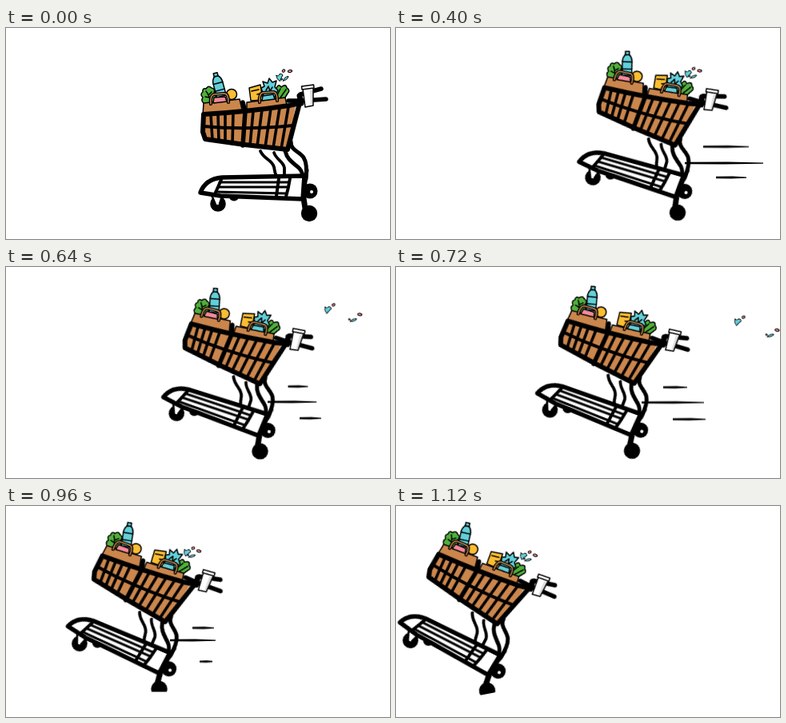
Recreate the animation shown at these times as an HTML page. Size 480 by 264 pixels, loop 1.2 s.

```html
<!DOCTYPE html>
<html lang="en">
<head>
<meta charset="utf-8">
<title>Shopping cart</title>
<style>
html, body { margin: 0; width: 100%; height: 100%; overflow: hidden; background: #fff; }
svg { display: block; width: 480px; height: 264px; }
.ink { fill: none; stroke: #000; stroke-linecap: round; stroke-linejoin: round; }
.thin { stroke: #000; stroke-width: 1.5; stroke-linejoin: round; stroke-linecap: round; }
.brown { fill: #cb864c; }
.teal { fill: #62d0da; }
.green { fill: #50b03c; }
.gold { fill: #fbbd32; }
.pink { fill: #f58a9b; }
.white { fill: #fff; }

.cart, .near, .far, .dash, .crop { animation: 1.2s infinite step-end; }
.cart { transform-origin: 379px 232px; animation-name: ride; }
.near { animation-name: near; }
.far { animation-name: far; }
.high { animation-name: high; }
.mid { animation-name: mid; }
.low { animation-name: low; }
.crop { animation-name: crop; }

/* Movement advances in 80 ms steps. */
@keyframes ride {
  0% { transform: translate(0, 0) rotate(0); }
  20% { transform: translate(-10px, -1px) rotate(16.5deg); animation-timing-function: steps(2); }
  33.33% { transform: translate(-27px, -1px) rotate(16.5deg); animation-timing-function: steps(2); }
  46.66% { transform: translate(-39px, -.7px) rotate(16.5deg); animation-timing-function: steps(2); }
  60% { transform: translate(-84px, -2px) rotate(20.5deg); animation-timing-function: steps(3); }
  80% { transform: translate(-187.5px, -3px) rotate(23.7deg); animation-timing-function: steps(2); }
  93.33%, 100% { transform: translate(-265px, -1px) rotate(27.2deg); }
}
@keyframes near {
  0%, 66.66%, 100% { transform: translate(0, 0); }
  33.33% { transform: translate(0, 0); animation-timing-function: steps(2); }
  46.66% { transform: translate(18px, -22px); animation-timing-function: steps(2); }
  60% { transform: translate(104px, -27px); }
}
@keyframes far {
  0%, 66.66%, 100% { transform: translate(0, 0); }
  33.33% { transform: translate(0, 0); animation-timing-function: steps(2); }
  46.66% { transform: translate(35px, -21px); animation-timing-function: steps(2); }
  60% { transform: translate(141px, -27px); }
}
@keyframes high {
  0% { transform: translate(402px, 149px) scaleX(0); }
  20% { transform: translate(402px, 149px) scaleX(.17); animation-timing-function: steps(2); }
  33.33% { transform: translate(384px, 148.5px) scaleX(.57); animation-timing-function: steps(2); }
  46.66% { transform: translate(371px, 148.5px) scaleX(.2); animation-timing-function: steps(2); }
  60% { transform: translate(334px, 150.5px) scaleX(.3); animation-timing-function: steps(3); }
  80% { transform: translate(233px, 152.5px) scaleX(.27); animation-timing-function: steps(2); }
  93.33%, 100% { transform: translate(160px, 153px) scaleX(0); }
}
@keyframes mid {
  0% { transform: translate(378px, 168px) scaleX(0); }
  20% { transform: translate(377px, 168px) scaleX(.45); animation-timing-function: steps(2); }
  33.33% { transform: translate(361px, 169px) scaleX(.98); animation-timing-function: steps(2); }
  46.66% { transform: translate(347px, 168px) scaleX(.45); animation-timing-function: steps(2); }
  60% { transform: translate(307px, 169.5px) scaleX(.78); animation-timing-function: steps(3); }
  80% { transform: translate(205px, 168px) scaleX(.57); animation-timing-function: steps(2); }
  93.33%, 100% { transform: translate(130px, 168px) scaleX(0); }
}
@keyframes low {
  0% { transform: translate(418px, 188px) scaleX(0); }
  20% { transform: translate(418px, 188px) scaleX(.08); animation-timing-function: steps(2); }
  33.33% { transform: translate(400px, 187px) scaleX(.38); animation-timing-function: steps(2); }
  46.66% { transform: translate(388px, 188px) scaleX(.13); animation-timing-function: steps(2); }
  60% { transform: translate(346px, 190.5px) scaleX(.41); animation-timing-function: steps(3); }
  80% { transform: translate(242px, 194.5px) scaleX(.16); animation-timing-function: steps(2); }
  93.33%, 100% { transform: translate(165px, 196px) scaleX(0); }
}
@keyframes crop {
  0% { opacity: 0; transform: translate(228px, 232.5px); }
  73.33% { opacity: 1; transform: translate(226px, 232.5px) rotate(0); }
  80% { opacity: 1; transform: translate(191px, 232.5px) rotate(0); animation-timing-function: steps(2); }
  93.33%, 100% { opacity: 1; transform: translate(112px, 235.5px) rotate(-11deg); }
}
</style>
</head>
<body>
<svg viewBox="0 0 480 264">
  <defs>
    <path id="dash" d="M0 -1.2L55 -1.6L100 -.6V.7L50 1.4L0 1.2Z"/>
    <path id="handle" d="M0 0Q-1 -11 4 -12L17 -13Q22 -13 22 -2"/>
  </defs>

  <use href="#dash" class="dash high"/>
  <use href="#dash" class="dash mid"/>
  <use href="#dash" class="dash low"/>

  <g class="cart">
    <!-- confetti -->
    <g class="thin" style="stroke-width:1">
      <g class="far">
        <circle class="teal" cx="344.5" cy="64" r="1"/>
        <path class="teal" d="M346.500 66Q348 61 353 60.500Q352 65 346.500 66Z"/>
        <ellipse class="pink" cx="355" cy="54" rx="2.600" ry="1.500" transform="rotate(-12 355 54)"/>
      </g>
      <g class="near">
        <path class="teal" d="M338 59.500Q341 61 342 57.500Q345.500 57 346 59Q344 62 342.500 66.500Q338 64 338 59.500Z"/>
        <ellipse class="pink" cx="347" cy="53.500" rx="2" ry="1.400" transform="rotate(-40 347 53.500)"/>
      </g>
    </g>

    <!-- groceries, left -->
    <g class="thin">
      <path class="green" d="M248 95Q243 91 246 87Q242 83 246 80Q245 75 250 76Q253 71 257 75Q262 76 260 81Q264 85 261 94Z"/>
      <path class="ink" d="M256 93Q254 84 250 79M254 87L249 86M253 84L257 80"/>
      <g transform="translate(265 69) rotate(-15)">
        <path class="teal" d="M-2.500 -9Q-6 -5 -6 -1V17H6V-1Q6 -5 2.500 -9Z"/>
        <path class="teal" d="M-2.500 -13H2.500V-9H-2.500Z"/>
        <path class="ink" d="M-6 0H6M-6 9H6"/>
      </g>
      <circle class="gold" cx="282" cy="83" r="6.500"/>
      <path class="brown" d="M247 94L292 89L296 106L246 109Z"/>
      <path class="pink" d="M259 94L260 87L274 86L276 92Z"/>
    </g>

    <!-- groceries, right -->
    <g class="thin">
      <path class="gold" d="M306 91L304 75L318 71L321 90Z"/>
      <path class="ink" d="M307 79L316 77M314 83L318 82"/>
      <path class="green" d="M335 88L338 75Q341 69 344 74Q350 69 351 75Q356 78 352 82L347 90Z"/>
      <path class="ink" d="M338 86L343 76M343 87L350 77"/>
      <path class="teal" d="M323 88L319 75L323 73L321 67L327 69L329 63L333 68L338 66L336 74L340 78L335 88Z"/>
      <path class="ink" d="M325 78L328 73L330 79L333 74"/>
      <path class="brown" d="M301 93L349 87L352 101L301 107Z"/>
      <path class="teal" d="M320 91L321 85L334 83L336 89Z"/>
    </g>
    <g class="ink">
      <g stroke-width="4.200"><use href="#handle" x="256" y="95"/><use href="#handle" x="317" y="93"/></g>
      <g stroke="#cb864c" stroke-width="1.500"><use href="#handle" x="256" y="95"/><use href="#handle" x="317" y="93"/></g>
    </g>

    <!-- basket -->
    <path class="brown" d="M246 107L352 97L362 98L352 152L300 147L248 139Z"/>
    <g class="ink">
      <path stroke-width="3.600" d="M256 108L258 140M265 107L266 142M274 106L274 143M284 105L283 145M309 104L305 147M320 102L314 148M331 101L324 149M342 100L334 150M353 99L344 151"/>
      <path stroke-width="4" d="M247 123Q300 128 358 122"/>
      <path stroke-width="5.500" d="M296 93L299 104L296 147"/>
      <path stroke-width="6" d="M247 108Q300 105 354 97L367 94L352 152Q300 147 249 139L246 130Z"/>
      <path stroke-width="5.500" d="M353 91L370 91L400 89M368 83L394 76"/>
      <path stroke-width="7" d="M367 85L369 94"/>
    </g>
    <g class="thin">
      <path class="white" d="M371 76L384 74L384 97L374 99Z"/>
      <path class="white" d="M369.500 73L384.500 71L385 75L370 77Z"/>
      <path fill="#ddd" stroke="none" d="M380 78L383 77.500V95L381 96Z"/>
    </g>

    <!-- legs -->
    <g class="ink">
      <path stroke-width="3.800" d="M318 154C322 164 333 165 335 174Q336 181 338 186M335 156C338 165 347 167 348 175V187"/>
      <path stroke-width="5" d="M349 154C352 167 362 170 367 176Q371 181 371 187M356 142C356 154 367 154 372 162Q377 170 375 189"/>
    </g>

    <!-- wheels -->
    <circle cx="285" cy="210" r="6.500"/>
    <circle cx="380" cy="204" r="9.500"/>
    <circle class="white" cx="382" cy="205" r="2"/>
    <circle cx="265" cy="220" r="9.800"/>
    <path class="white" d="M258 210L269 211L266 221L262 221Z"/>
    <path class="ink" stroke-width="2.500" d="M257 209L262 221M270 211L267 220"/>
    <path class="ink" stroke="#fff" stroke-width="1.800" d="M260 223L261 224M269 224L270 222"/>
    <path class="ink" stroke-width="7" d="M372 213L374 226"/>
    <circle cx="379" cy="232" r="10.200"/>
    <path class="ink" stroke="#fff" stroke-width="2.600" d="M375 227L377 230M382 232L383 232M376 236L377 236"/>

    <!-- lower frame -->
    <path class="white" d="M243 206Q249 189 270 187L373 185L371 214L268 210Z"/>
    <g class="ink">
      <path stroke-width="5.500" d="M243 206Q249 189 270 187L373 185L371 214L268 210Z"/>
      <path stroke-width="3" d="M267 193L353 193M265 199L351 199M262 205L350 207"/>
      <path stroke-width="4" d="M269 190L261 208M355 188Q353 201 350 211M341 188L338 210"/>
      <path stroke-width="5" d="M376 178L371 214"/>
    </g>
  </g>

  <path class="white crop" d="M-20 0H20V14H-20Z"/>
</svg>
</body>
</html>
```
